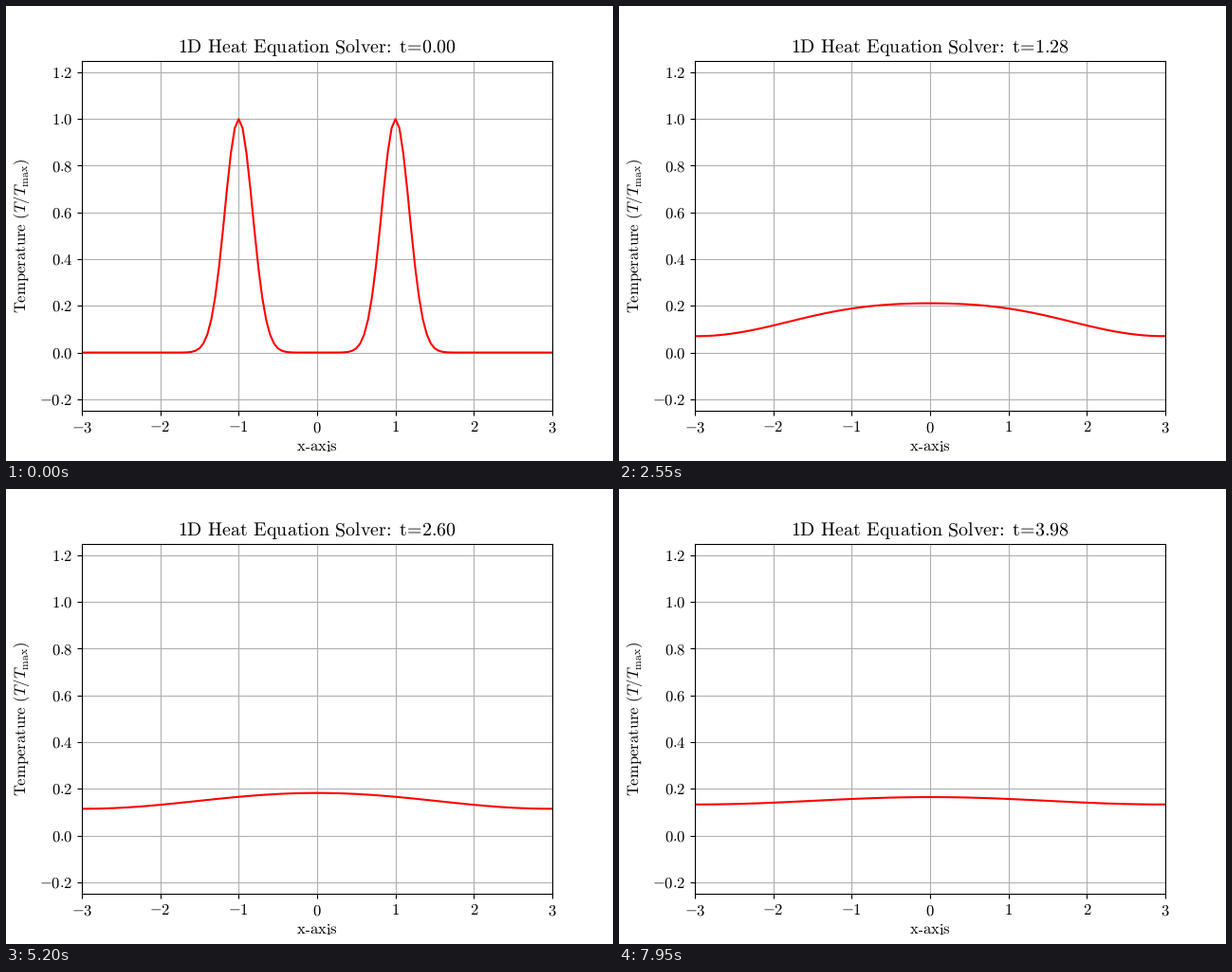
Recreate the animation shown at these times as a matplotlib script. Size 640 by 480 pixels, loop 8 s.

```python
import numpy as np
import matplotlib.pyplot as plt
from matplotlib.animation import FuncAnimation
from matplotlib.patches import Rectangle

W, H, DPI = 640, 480, 100
FRAMES, INTERVAL = 160, 50
DT, STEPS = 0.0025, 10          # solver step, steps per frame
ALPHA = 0.5
BODY, HEAD = 11.96, 14.35       # font sizes in points
GAP, WIDE_GAP = r"\hspace{0.38}", r"\hspace{0.506}"

plt.rcParams.update({"mathtext.fontset": "cm", "text.hinting": "none"})


def roman(words):
    """Upright Computer Modern text with ordinary word spaces."""
    return GAP.join(r"\text{%s}" % w for w in words.split())


def label(x, y, s, size=BODY, **kw):
    """Text with its baseline at pixel (x, y), measured from the top left."""
    opts = dict(ha="center", va="baseline") | kw
    return fig.text(x / W, 1 - y / H, f"${s}$", fontsize=size, **opts)


def number(value, fmt):
    sign = "-" if value < -1e-9 else ""
    return sign + r"\text{%s}" % format(abs(value), fmt)


def solve():
    """Explicit heat equation with insulated ends, one row per frame."""
    dx = x[1] - x[0]
    r = ALPHA * DT / dx**2
    temp = np.exp(-((x + 1) / 0.25) ** 2) + np.exp(-((x - 1) / 0.25) ** 2)
    rows = [temp.copy()]
    for _ in range(FRAMES - 1):
        for _ in range(STEPS):
            temp[1:-1] += r * (temp[2:] - 2 * temp[1:-1] + temp[:-2])
            temp[0], temp[-1] = temp[1], temp[-2]
        rows.append(temp.copy())
    return rows


def title_text(i):
    t = i * STEPS * DT
    return (f"${roman('1D Heat Equation Solver:')}{WIDE_GAP}"
            + r"\text{t=%.2f}$" % t)


x = np.linspace(-3, 3, 121)
states = solve()

fig = plt.figure(figsize=(W / DPI, H / DPI), dpi=DPI, facecolor="white")
ax = fig.add_axes([0.125, 0.11, 0.775, 0.77])
ax.set(xlim=(-3, 3), ylim=(-0.25, 1.25))
xticks = np.arange(-3, 4)
yticks = np.arange(-1, 7) * 0.2
ax.set_xticks(xticks)
ax.set_yticks(yticks)
ax.tick_params(labelbottom=False, labelleft=False)
ax.grid(True)
line, = ax.plot(x, states[0], "r", lw=1.5)

for v in xticks:
    label(80 + (v + 3) * 496 / 6, 449.3, number(v, "d"))
for v in yticks:
    label(70.3, 365.6 - v * 246.4 + 5.7, number(v, ".1f"), ha="right")

# The hyphen is drawn as a bar so that it does not become a minus sign.
label(328, 470, roman("x axis"))
fig.add_artist(Rectangle((316 / W, 1 - 467 / H), 4 / W, 1 / H,
                         fc="black", lw=0))
label(21, 242, roman("Temperature (") + r"T/T_{\mathrm{max}}\text{)}",
      rotation=90, rotation_mode="anchor")
title = label(328, 49, "", HEAD) if False else fig.text(
    328 / W, 1 - 49 / H, title_text(0), fontsize=HEAD,
    ha="center", va="baseline")


def update(i):
    line.set_ydata(states[i])
    title.set_text(title_text(i))
    return line, title


anim = FuncAnimation(fig, update, frames=FRAMES, interval=INTERVAL,
                     repeat=True, repeat_delay=0, blit=False)
plt.show()
```
